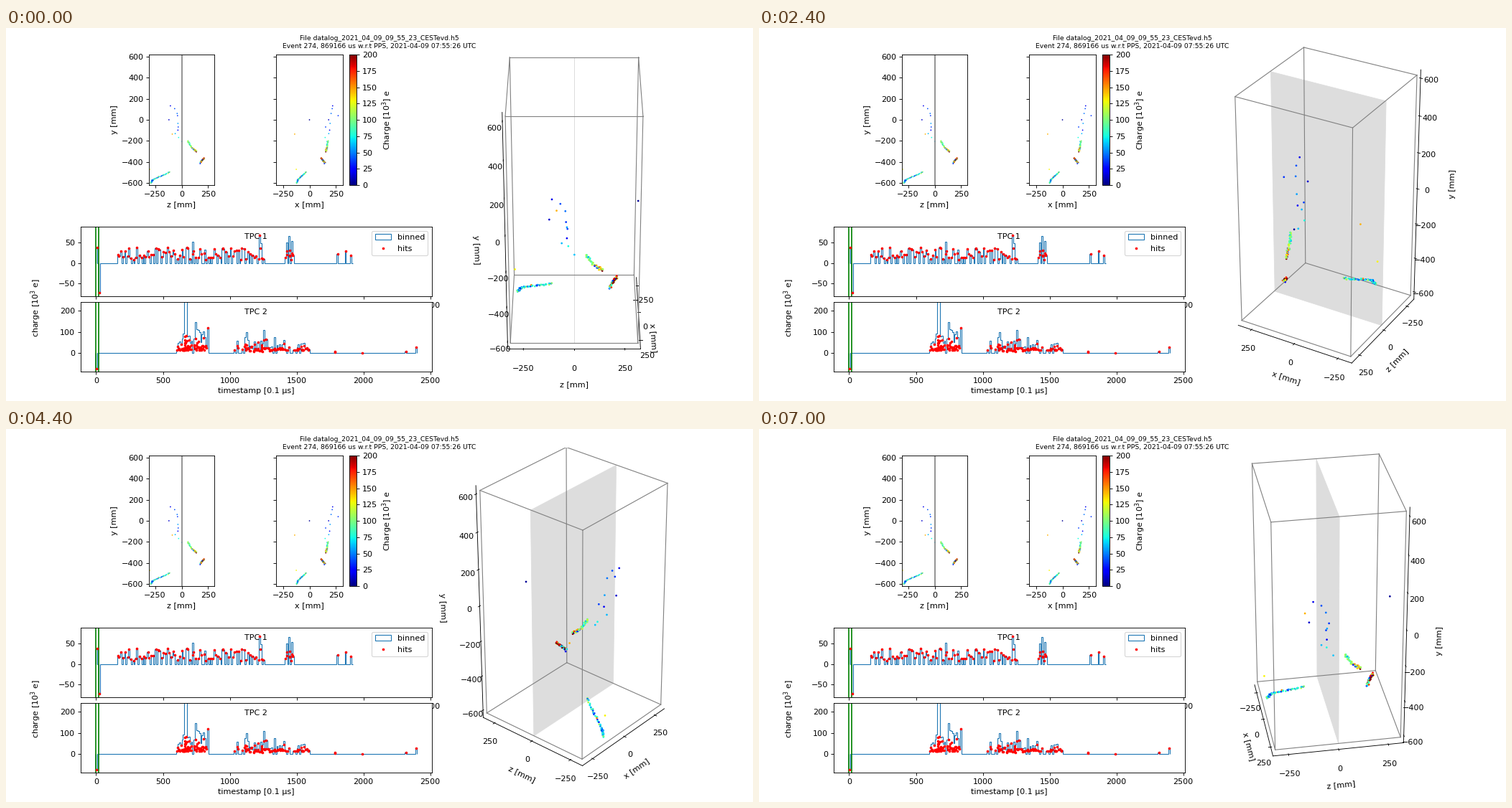
A matplotlib script that plays this animation: 1040x520 px, repeating every 7.2 s.

```python
import numpy as np
import matplotlib.pyplot as plt
from matplotlib.animation import FuncAnimation
from mpl_toolkits.mplot3d.art3d import Poly3DCollection

W, H, DPI = 1040, 520, 80
FRAMES, INTERVAL = 36, 200
X_MAX, Y_MAX, Z_MAX = 315, 618, 314
rng = np.random.default_rng(274)

plt.rcParams.update({"font.family": "DejaVu Sans", "font.size": 10})
fig = plt.figure(figsize=(W / DPI, H / DPI), dpi=DPI, facecolor="white")


def add_axes(left, top, right, bottom, **kw):
    """Axes placed by pixel edges measured from the top left."""
    return fig.add_axes([left / W, 1 - bottom / H,
                         (right - left) / W, (bottom - top) / H], **kw)


def track(path, count, jitter, charge, spread):
    """Hits (x, y, z, q) scattered along a polyline of (x, y, z) points."""
    path = np.array(path, float)
    along = np.linspace(0, len(path) - 1, count)
    pos = np.column_stack([np.interp(along, range(len(path)), path[:, k])
                           for k in range(3)])
    pos += rng.normal(size=pos.shape) * jitter
    q = np.clip(rng.normal(charge, spread, count), 4, 200)
    return np.column_stack([pos, q])


hits = np.vstack([
    # lone hits
    track([(235, 137, -60), (160, -200, -25)], 11, (25, 6, 42), 42, 20),
    track([(-140, -135, -88), (-125, -468, -302)], 2, 0, 140, 8),
    track([(0, 0, 314)], 1, 0, 4, 0),
    # particle tracks
    track([(-120, -595, -290), (-108, -565, -268), (-32, -495, -110)],
          60, 2.5, 65, 28),
    track([(177, -197, 57), (167, -255, 92)], 22, 3, 92, 20),
    track([(166, -262, 95), (155, -300, 143)], 24, 3, 90, 60),
    track([(110, -362, 210), (148, -408, 175)], 40, 3.5, 140, 75),
])
x, y, z, q = hits.T
colour = dict(c=q, cmap="jet", vmin=0, vmax=200)

fig.suptitle("File datalog_2021_04_09_09_55_23_CESTevd.h5\n"
             "Event 274, 869166 us w.r.t PPS, 2021-04-09 07:55:26 UTC",
             fontsize="small")

# Side projections
ax_zy = add_axes(199, 37, 290, 219)
ax_xy = add_axes(376, 37, 469, 219)
ax_bar = add_axes(478, 37, 488, 219)
for ax, across, limit, name in ((ax_zy, z, 308, "z"), (ax_xy, x, 316, "x")):
    dots = ax.scatter(across, y, s=2.4, linewidths=0, **colour)
    ax.set(xlim=(-limit, limit), ylim=(-617, 617), xlabel=f"{name} [mm]",
           xticks=(-250, 0, 250), yticks=range(-600, 601, 200))
ax_zy.axvline(0, color="gray")
ax_zy.set_ylabel("y [mm]")
ax_xy.tick_params(labelleft=False)
fig.colorbar(dots, cax=ax_bar, label="Charge [$10^3$] e",
             ticks=range(0, 201, 25))


# Charge against time
def burst(count, start, end, floor, scale):
    """Random hits (t, charge) with an exponential charge tail."""
    t = rng.uniform(start, end, count)
    charge = floor + np.minimum(rng.exponential(scale, count), 4 * scale)
    return np.column_stack([t, charge])


def comb(count, start, end, low, high):
    """Nearly evenly spaced hits (t, charge)."""
    t = np.linspace(start, end, count) + rng.normal(0, 4, count)
    return np.column_stack([t, rng.uniform(low, high, count)])


def draw_charge(ax, parts, end, ylim, title):
    t, charge = np.vstack(parts).T
    ax.hist(t, bins=np.arange(0, end + 1, 10), weights=charge,
            histtype="step", label="binned")
    for mark in (0, 20):
        ax.axvline(mark, color="g")
    ax.plot(t, charge, "r.", ms=4.5, label="hits")
    ax.set(xlim=(-115.5, 2513), ylim=ylim, xticks=range(0, 2501, 500))
    ax.text(0.498, 0.82, title, transform=ax.transAxes, ha="center")


ax_tpc1 = add_axes(104, 277, 593, 374)
ax_tpc2 = add_axes(104, 382, 593, 479)
draw_charge(ax_tpc1,
            [[(8, 38), (22, -72), (1225, 68)], comb(74, 158, 1258, 8, 38),
             comb(10, 1425, 1475, 8, 32), comb(3, 1810, 1914, 7, 30)],
            1920, (-81, 89.5), "TPC 1")
draw_charge(ax_tpc2,
            [[(2, -75), (838, 118)], burst(70, 604, 835, 12, 17),
             burst(40, 1022, 1300, 8, 14), burst(38, 1300, 1592, 12, 8),
             comb(2, 1787, 1796, -3, 13), comb(2, 1990, 2322, 0, 8),
             [(2393, 28)]],
            2400, (-88, 241), "TPC 2")
ax_tpc1.legend(loc="upper right")
ax_tpc2.set_xlabel("timestamp [0.1 µs]")
fig.text(0.04, 0.25, "charge [$10^3$ e]", rotation=90,
         ha="center", va="center")

# Rotating detector volume; the vertical axis shows y
ax3d = add_axes(564, 26, 1006, 468, projection="3d", computed_zorder=False)
ax3d.patch.set_visible(False)
ax3d.grid(False)
plane = [(X_MAX, 0, Y_MAX), (X_MAX, 0, -Y_MAX),
         (-X_MAX, 0, -Y_MAX), (-X_MAX, 0, Y_MAX)]
ax3d.add_collection3d(Poly3DCollection(
    [plane], facecolor="#dddddd", edgecolor="#dddddd", linewidth=0.7,
    zorder=1))


def draw_edge(a, b):
    ax3d.plot(*zip(a, b), color="gray", lw=1, zorder=2)


for a in (-1, 1):
    for b in (-1, 1):
        draw_edge((-X_MAX, a * Z_MAX, b * Y_MAX), (X_MAX, a * Z_MAX, b * Y_MAX))
        draw_edge((a * X_MAX, -Z_MAX, b * Y_MAX), (a * X_MAX, Z_MAX, b * Y_MAX))
        draw_edge((a * X_MAX, b * Z_MAX, -Y_MAX), (a * X_MAX, b * Z_MAX, Y_MAX))
ax3d.scatter(x, z, y, s=6, linewidths=0, depthshade=False, zorder=3, **colour)

margin = 25 / 24
ax3d.set_xlim(-X_MAX * margin, X_MAX * margin)
ax3d.set_ylim(-Z_MAX * margin, Z_MAX * margin)
ax3d.set_zlim(-Y_MAX * margin, Y_MAX * margin)
ax3d.set_box_aspect((1, 1, 2))
ax3d.set(xlabel="x [mm]", ylabel="z [mm]",
         xticks=(-250, 0, 250), yticks=(-250, 0, 250),
         zticks=range(-600, 601, 200))
ax3d.set_zlabel("y [mm]", labelpad=20)
for axis in (ax3d.xaxis, ax3d.yaxis, ax3d.zaxis):
    axis.set_pane_color((1, 1, 1, 0))


def update(frame):
    angle = 2 * np.pi * frame / FRAMES
    # A tiny nudge settles which side carries the axes in edge-on views
    nudge = 1e-5 * (np.cos(angle) - np.sin(angle))
    ax3d.view_init(elev=30, azim=np.degrees(angle) + nudge)
    return []


anim = FuncAnimation(fig, update, frames=FRAMES, interval=INTERVAL,
                     repeat=True, repeat_delay=0)
plt.show()
```
